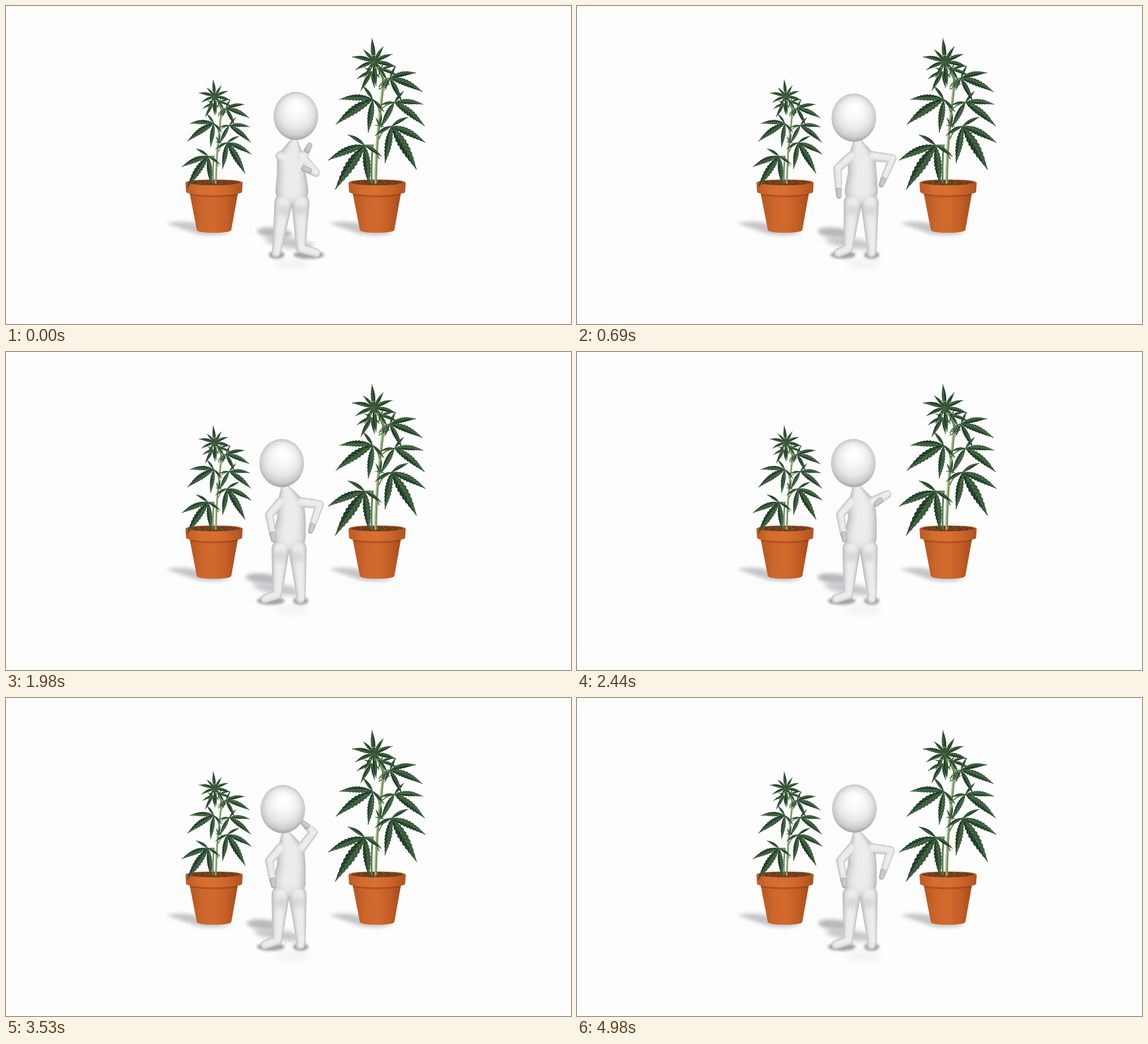
An HTML page with a canvas that plays this animation: 998x561 px, repeating every 5010 ms.

```html
<!DOCTYPE html>
<html lang="en">
<head>
<meta charset="utf-8">
<style>
html, body { margin: 0; width: 100%; height: 100%; overflow: hidden; background: #fdfdfd; }
canvas { display: block; width: 998px; height: 561px; }
</style>
</head>
<body>
<canvas id="stage" width="998" height="561"></canvas>
<script>
const W = 998, H = 561, LOOP = 5010;
const stage = document.getElementById('stage').getContext('2d');
const backdrop = Object.assign(document.createElement('canvas'), { width: W, height: H });
const bg = backdrop.getContext('2d');
const mix = (a, b, k) => a + (b - a) * k;
const mixPoint = (p, q, k) => p.map((v, i) => mix(v, q[i], k));

function softEllipse(x, y, rx, ry, color, blur, tilt = 0) {
  stage.save();
  stage.filter = `blur(${blur}px)`;
  stage.fillStyle = color;
  stage.beginPath();
  stage.ellipse(x, y, rx, ry, tilt, 0, 7);
  stage.fill();
  stage.restore();
}

// ---------- plants ----------

// Serrated leaflet that arches up and droops towards its tip.
function leaf(x, y, degrees, length) {
  const a = degrees * Math.PI / 180, n = 22;
  const ux = Math.cos(a), uy = Math.sin(a);
  const at = (t, side) => [
    x + ux * length * t - uy * side,
    y + uy * length * t + ux * side - 0.24 * length * Math.abs(ux) * t * (1 - t),
  ];
  const half = (i) => length * 0.09 * Math.sin(Math.PI * (i / n) ** 0.85) * (i % 2 ? 1.12 : 0.86);
  for (const [side, color] of [[-1, '#39583a'], [1, '#1c3a26']]) {
    bg.fillStyle = color;
    bg.beginPath();
    for (let i = 0; i <= n; i++) bg.lineTo(...at(i / n, side * half(i)));
    for (let i = n; i >= 0; i--) bg.lineTo(...at(i / n, -side * 0.4));
    bg.fill();
  }
  bg.strokeStyle = '#86a578a0';
  bg.lineWidth = 0.7;
  bg.beginPath();
  for (let i = 0; i < n; i++) bg.lineTo(...at(i / n, 0));
  for (let i = 4; i < n - 3 && length > 50; i += 2) for (const side of [-1, 1]) {
    bg.moveTo(...at(i / n, 0));
    bg.lineTo(...at((i + 1.5) / n, side * half(i) * 0.8));
  }
  bg.stroke();
}

function stem(color, width, path) {
  bg.strokeStyle = color;
  bg.lineWidth = width;
  bg.stroke(new Path2D(path));
}

// Five leaflets around a heading, shorter towards the sides; inner is the spread on the stem side.
function fan(x, y, heading, size, inner = 40) {
  stem('#587d48', 2, `M${x} ${y} Q${mix(x, 659, 0.7)} ${y + 4} 659 ${y + size * 0.25}`);
  const toStem = x < 655 ? -1 : 1;
  leaf(x, y, heading - toStem * 88, size * 0.38);
  leaf(x, y, heading + toStem * (inner + 50), size * 0.38);
  leaf(x, y, heading - toStem * 34, size * 0.75);
  leaf(x, y, heading + toStem * inner, size * 0.75);
  leaf(x, y, heading, size);
}

function plant(x, y, scale) {
  bg.save();
  bg.translate(x, y);
  bg.scale(scale, scale);
  bg.translate(-652, -310);
  bg.lineCap = 'round';
  stem('#6f8f55', 4.5, 'M653 312 Q654 250 659 205 T667 130 L652 98');
  stem('#b3c49a', 1.5, 'M652 312 Q653 250 658 205 T666 130');
  stem('#587d48', 3, 'M646 312 Q645 270 648 246 L634 246');
  fan(660, 212, -80, 22);
  fan(666, 142, -60, 18);
  fan(634, 246, 124, 94);
  fan(681, 212, 60, 89);
  fan(648, 165, 146, 79, 48);
  fan(686, 170, 38, 68, 80);
  fan(678, 127, 23, 63);
  fan(662, 112, 20, 31);
  fan(646, 116, 120, 39);
  for (let i = 0; i < 10; i++) {
    const degrees = 36 * i - 95;
    leaf(650, 99, degrees, 36 + 7 * Math.cos(degrees * Math.PI / 45));
  }
  bg.fillStyle = '#9cac4f';
  for (let i = 0; i < 12; i++) {
    bg.fillRect(651 + 9 * Math.sin(i * 5.3), 97 + 11 * Math.cos(i * 3.1), 2, 2);
  }
  bg.restore();
}

// ---------- pots ----------

function clay(half, ...colors) {
  const g = bg.createLinearGradient(-half, 0, half, 0);
  colors.forEach((color, i) => g.addColorStop(i / (colors.length - 1), color));
  return g;
}

function pot(x) {
  bg.save();
  bg.translate(x, 0);
  bg.filter = 'blur(3px)';
  bg.fillStyle = '#c6c6ca';
  bg.fill(new Path2D('M-84 383 Q-50 377 -24 386 L30 400 Q0 408 -30 402 Z'));
  bg.filter = 'none';
  bg.fillStyle = clay(43, '#b4561f', '#cc662c', '#d26a2e', '#c65f27', '#a54c1c');
  bg.fill(new Path2D('M-43 328 L43 328 L31 395 Q29 400 0 400 Q-28 400 -30 395 Z'));
  bg.fillStyle = '#7e320f60';
  bg.fill(new Path2D('M-43 328 L43 328 L42 334 Q0 341 -42 334 Z'));
  bg.fillStyle = clay(51, '#ba5a24', '#d46d30', '#d96f30', '#cd642a', '#ae5320');
  bg.fill(new Path2D('M-50 312 Q-49 306 0 306 Q50 306 51 312 L50 328 Q48 333 0 334 Q-47 333 -49 328 Z'));
  bg.fillStyle = '#70401f';
  bg.beginPath();
  bg.ellipse(0, 311.5, 46, 4.8, 0, 0, 7);
  bg.fill();
  for (let i = 0; i < 90; i++) {
    const a = i * 2.4, r = Math.sqrt(i / 90);
    bg.fillStyle = i % 2 ? '#48260f' : '#986239';
    bg.fillRect(44 * r * Math.cos(a), 311 + 4 * r * Math.sin(a), 1.5, 1);
  }
  bg.restore();
}

bg.fillStyle = '#fdfdfd';
bg.fillRect(0, 0, W, H);
pot(367);
pot(655);
plant(370, 311, 0.715);
plant(652, 310, 1);

// ---------- figure ----------

// Each arm is elbow then wrist; the rest of the body follows from head, hip and toes.
const thinking = {
  head: [512, 193], hip: [505, 327], toes: [477, 549],
  elbowL: [516, 284], wristL: [532, 254], elbowR: [547, 294], wristR: [535, 290],
};
const turning = {
  head: [500, 193], hip: [502, 327], toes: [479, 539],
  elbowL: [458, 281], wristL: [454, 287], elbowR: [552, 289], wristR: [538, 302],
};
const settling = {
  head: [489, 196], hip: [502, 327], toes: [461, 520],
  elbowL: [460, 286], wristL: [462, 326], elbowR: [557, 269], wristR: [541, 307],
};
const standing = {
  ...settling, head: [487, 195], hip: [500, 327], toes: [456, 520],
  elbowL: [465, 287], wristL: [471, 322], elbowR: [554, 269],
};
const scratching = { ...standing, head: [489, 195], elbowR: [543, 237], wristR: [531, 226] };
const rubbing = { ...standing, elbowR: [553, 241], wristR: [531, 234] };
const resting = { ...standing, head: [490, 194] };

const TIMELINE = [
  [0, thinking], [30, thinking], [260, turning], [660, settling], [1060, standing],
  [2210, standing], [2640, scratching], [2970, scratching], [3230, rubbing],
  [3520, scratching], [3800, rubbing], [4060, rubbing], [4260, standing],
  [4950, standing], [4980, resting], [LOOP, resting],
];

function poseAt(t) {
  const i = TIMELINE.findIndex(([time]) => time > t);
  const [t0, a] = TIMELINE[i - 1], [t1, b] = TIMELINE[i];
  const k = (t - t0) / (t1 - t0), eased = k * k * (3 - 2 * k);
  const pose = {};
  for (const part in a) pose[part] = mixPoint(a[part], b[part], eased);
  return pose;
}

// A tapered tube through joints, as rows of overlapping discs.
function tube(path, { joints, radii }, size, shift) {
  for (let i = 0; i + 1 < joints.length; i++) {
    for (let k = 0; k <= 1; k += 0.05) {
      const [x, y] = mixPoint(joints[i], joints[i + 1], k);
      const r = mix(radii[i], radii[i + 1], k) * size;
      path.moveTo(x + shift + r, y - shift);
      path.arc(x + shift, y - shift, r, 0, 7);
    }
  }
}

// Nested layers from a dark rim to a bright middle.
function shade(tubes, dark, bright) {
  for (let i = 0; i < 8; i++) {
    const path = new Path2D(), k = i / 7;
    for (const part of tubes) tube(path, part, 1 - 0.7 * k, 1.4 * k);
    const grey = mix(dark, bright, 1 - (1 - k) ** 2);
    stage.fillStyle = `rgb(${grey}, ${grey}, ${grey + 2})`;
    stage.fill(path);
  }
}

function drawHead([x, y]) {
  const g = stage.createRadialGradient(x + 2, y - 17, 4, x, y, 43);
  g.addColorStop(0, '#ffffff');
  g.addColorStop(0.35, '#f6f6f6');
  g.addColorStop(0.65, '#e6e6e7');
  g.addColorStop(0.88, '#cacacd');
  g.addColorStop(1, '#a6a6a9');
  stage.fillStyle = g;
  stage.beginPath();
  stage.ellipse(x, y + 1, 39.5, 42.5, 0, 0, 7);
  stage.fill();
}

function drawFigure({ head, hip, toes, elbowL, wristL, elbowR, wristR }) {
  const chest = [503, 273];
  const neck = [mix(head[0], hip[0], 0.5), 241];
  const legs = [-1, 1].map((side, i) => {
    const top = [hip[0] + side * 15, 347], ankle = [500 + side * 21, 428];
    const knee = mixPoint(top, ankle, 0.46);
    return { joints: [top, knee, ankle, [toes[i], 436]], radii: [16, 12.5, 8.5, 8] };
  });
  const arms = [[-1, elbowL, wristL], [1, elbowR, wristR]].map(([side, elbow, wrist]) => (
    { joints: [[chest[0] + side * 18, 265], elbow, wrist], radii: [9, 7.5, 6] }));
  const hands = arms.map(({ joints: [, elbow, wrist] }) => {
    const dx = wrist[0] - elbow[0], dy = wrist[1] - elbow[1], reach = 10 / Math.hypot(dx, dy);
    return { joints: [wrist, [wrist[0] + dx * reach, wrist[1] + dy * reach]], radii: [5.5, 4.5] };
  });
  const torso = { joints: [neck, chest, [504, 297], hip], radii: [8, 24.5, 25.5, 29.5] };

  const lean = (head[0] - 489) * 0.8;
  softEllipse(456 + lean, 400, 31, 9, '#b9b9bd', 3, 0.1);
  softEllipse(482 + lean, 418, 44, 9, '#c6c6ca', 4, 0.15);
  softEllipse(505, 455, 30, 10, '#f4f4f6', 5);
  for (const { joints: [, , ankle, toe] } of legs) {
    softEllipse((ankle[0] + toe[0]) / 2, 439, Math.abs(ankle[0] - toe[0]) / 2 + 13, 7, '#a4a4a8', 2);
  }
  shade([torso, ...legs, ...arms], 192, 236);
  for (const { joints: [top] } of legs) softEllipse(top[0], 361, 11, 9, '#a4a4a84d', 4);
  shade(hands, 165, 202);
  drawHead(head);
}

function frame() {
  stage.drawImage(backdrop, 0, 0);
  drawFigure(poseAt(performance.now() % LOOP));
  requestAnimationFrame(frame);
}
frame();
</script>
</body>
</html>
```
